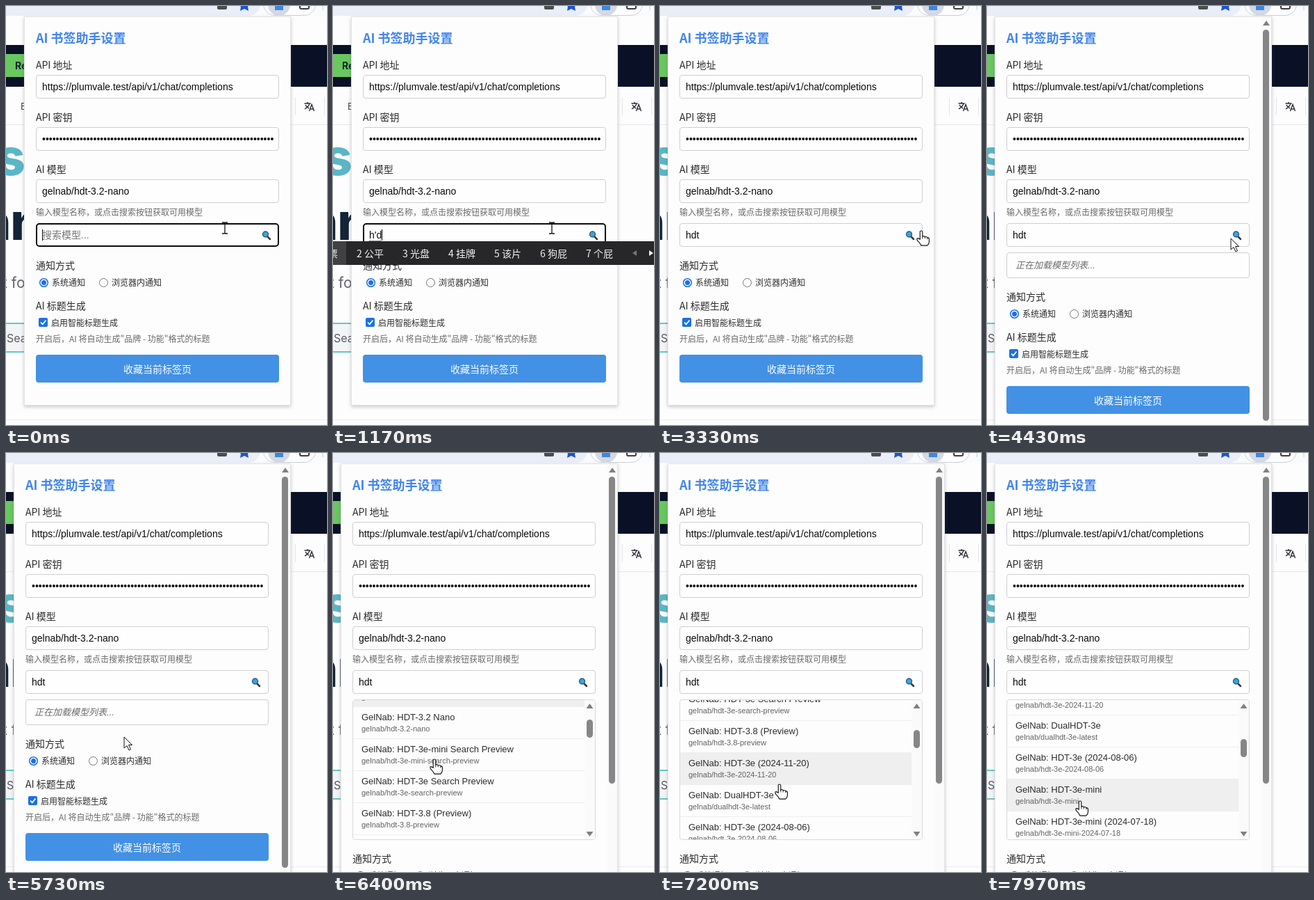
An HTML page that plays this animation: 462x602 px, repeating every 8000 ms.

```html
<!DOCTYPE html>
<html lang="zh-CN">
<head>
<meta charset="utf-8">
<title>书签设置</title>
<style>
html, body { margin: 0; width: 100%; height: 100%; overflow: hidden; background: #fdfdfe; }
#stage { position: absolute; left: 0; top: 0; width: 462px; height: 602px; overflow: hidden; background: #fdfdfe; color: #2c2c2e; }
#stage div, #stage svg { position: absolute; box-sizing: border-box; }
#stage svg { left: 0; top: 0; overflow: visible; }
#content, #lower, #cursor { left: 0; top: 0; }
.t { white-space: pre; line-height: 20px; }
.cjk { font-family: "Noto Sans CJK SC", "Noto Sans CJK", sans-serif; }
.arial { font-family: "Liberation Sans", "Noto Sans CJK SC", "Noto Sans CJK", sans-serif; }
.inter { font-family: Inter, sans-serif; }
.field { border: 1px solid #cfcfd4; border-radius: 4px; background: #fefefe; }
.field.focus { border: 2px solid #0c0c0e; border-radius: 5px; }
#card { top: 15px; background: #fdfdfd; border: 1px solid #e4e4e6; box-shadow: 0 2px 5px rgba(80, 80, 90, .3); }
#query i { display: inline-block; width: 1px; height: 16px; margin-right: -1px; vertical-align: -3px; background: #000; }
#query u { text-decoration: underline dotted 1px; text-underline-offset: 3px; }
#query em { font-style: normal; color: #757575; }
#list { left: 43px; top: 354px; width: 350px; height: 202px; overflow: hidden; border: 1px solid #d9d9dc; border-radius: 4px; background: #fdfdfd; }
#rows { left: 0; top: 0; width: 333px; }
.row { left: 0; width: 333px; height: 46px; border-bottom: 1px solid #eeeeef; }
.row.on { background: #efefef; }
#ime { left: 0; top: 338px; width: 462px; height: 34px; background: #272729; overflow: hidden; }
</style>
</head>
<body>
<div id="stage"></div>
<script>
const LOOP = 8000;
const stage = document.getElementById('stage');

function box(parent, css, className = '', id = '') {
  const el = document.createElement('div');
  el.className = className;
  el.id = id;
  el.style.cssText = css;
  parent.append(el);
  return el;
}
const rect = (parent, x, y, w, h, css = '', cls = '', id = '') =>
  box(parent, `left:${x}px;top:${y}px;width:${w}px;height:${h}px;${css}`, cls, id);

// y is the centre of the text line
function text(parent, x, y, size, str, cls = 'cjk', css = '') {
  const el = box(parent, `left:${x}px;top:${y - 10}px;font-size:${size}px;${css}`, 't ' + cls);
  el.textContent = str;
  return el;
}
function svg(parent, markup) {
  parent.insertAdjacentHTML('beforeend', `<svg width="1" height="1">${markup}</svg>`);
  return parent.lastElementChild;
}

// Browser toolbar and the page behind the popup
rect(stage, 0, 0, 462, 15, 'background:#fafbfe');
rect(stage, -20, -20, 386, 34, 'background:#e9eef8;border-radius:17px');
rect(stage, 370, -20, 76, 34, 'background:#fdfdfe;border:1px solid #cdd0d8;border-radius:17px');
svg(stage, `<circle cx="393" cy="-2" r="16" fill="#d3d9e4"/>
  <rect x="387" y="-6" width="12" height="12" fill="#3f86e4"/>
  <rect x="304" y="-8" width="14" height="13" rx="2" fill="#4c4c50"/>
  <path d="M343-10l3 6 6 1-4 4 1 6-6-3-6 3 1-6-4-4 6-1z" fill="#1b53d6"/>
  <rect x="423" y="-8" width="13" height="12" rx="2" fill="none" stroke="#3d3d42" stroke-width="2"/>
  <path d="M456 0v6" stroke="#c8ccd6"/>`);
rect(stage, 0, 56, 462, 60, 'background:#0a1026');
rect(stage, -30, 69, 90, 33, 'background:#69c75f;border-radius:3px');
text(stage, 13, 86, 14, 'Re', 'inter', 'font-weight:700;color:#10222c');
text(stage, 21, 144, 13, 'E', 'inter', 'color:#44444a');
rect(stage, 0, 170, 462, 1, 'background:#e8e8ee');
rect(stage, 0, 594, 462, 1, 'background:#ececf2');
rect(stage, 416, 131, 1, 26, 'background:#e4e4ea');
rect(stage, 458, 131, 1, 26, 'background:#e4e4ea');
svg(stage, `<g fill="none" stroke="#2c2c38" stroke-width="1.4">
  <path d="M429.500 140h9M434 138v2M437 140c-1 4-4 6-7 8M431 142c1 3 3 4 5 5"/>
  <path d="M436.500 151l3.500-9.500 3.500 9.500M437.700 148h4.600"/></g>`);
text(stage, -14, 217, 73, 's', 'inter', 'font-weight:800;color:#5ab6c6');
text(stage, -39, 310, 73, 'nn', 'inter', 'font-weight:800;color:#122436;letter-spacing:-1px');
text(stage, -5, 398, 21, 't for', 'inter', 'color:#64646c');
rect(stage, -20, 455, 120, 43, 'background:#f3f4f6;border:2px solid #62c8c6');
text(stage, 1, 477, 16, 'Search', 'inter', 'color:#5a5a64');

// Popup
const card = box(stage, '', '', 'card');
const content = box(stage, '', '', 'content');
const label = (parent, y, str) => text(parent, 43, y - 1, 14, str, 'cjk', 'font-weight:500');
const field = (y, str) => {
  const el = rect(content, 43, y, 350, 34, '', 'field');
  const value = text(content, 52, y + 17, 14, str, 'arial', 'color:#0a0a0a;width:333px;overflow:hidden');
  return { el, value };
};
text(content, 43, 45, 18, 'AI 书签助手设置', 'cjk', 'font-weight:700;color:#4285ee');
label(content, 85, 'API 地址');
field(99, 'https://plumvale.test/api/v1/chat/completions');
label(content, 160, 'API 密钥');
field(174, '•'.repeat(68));
label(content, 235, 'AI 模型');
field(249, 'gelnab/hdt-3.2-nano');
text(content, 43, 296, 12, '输入模型名称，或点击搜索按钮获取可用模型', 'cjk', 'color:#6a6a6c');
const search = field(312, '');
search.value.id = 'query';
svg(content, `<path d="M376 331l4 4" stroke="#3a3a3e" stroke-width="2.500" stroke-linecap="round"/>
  <circle cx="373.500" cy="328" r="4" fill="#36a4e0" stroke="#30597c" stroke-width="1.400"/>`);

const lower = box(content, '', '', 'lower');
label(lower, 373, '通知方式');
text(lower, 66, 397, 12, '系统通知');
text(lower, 152, 397, 12, '浏览器内通知');
label(lower, 431, 'AI 标题生成');
text(lower, 65, 455, 12, '启用智能标题生成');
text(lower, 43, 478, 12, '开启后，AI 将自动生成"品牌 - 功能"格式的标题', 'cjk', 'color:#6a6a6c');
svg(lower, `<circle cx="54.500" cy="397.500" r="5.800" fill="#fdfdfd" stroke="#1a70e4" stroke-width="1.500"/>
  <circle cx="54.500" cy="397.500" r="3.500" fill="#1a70e4"/>
  <circle cx="140.500" cy="397.500" r="6" fill="#fdfdfd" stroke="#767676"/>
  <rect x="47" y="448" width="13" height="13" rx="2" fill="#1a70e4"/>
  <path d="M50 454.500l2.700 2.800 4.800-5.800" fill="none" stroke="#fff" stroke-width="1.800"/>`);
const button = rect(lower, 43, 501, 350, 40, 'background:#4391e4;border-radius:4px');
text(button, 126, 20, 14, '收藏当前标签页', 'cjk', 'color:#fff;font-weight:500');

const loading = rect(content, 43, 354, 350, 37, '', 'field');
text(loading, 12, 18, 13, '正在加载模型列表...', 'arial', 'font-style:italic;color:#6a6a6c');

// Search results
const models = [
  ['HDT-3.2', 'hdt-3.2'],
  ['HDT-3.2 Mini', 'hdt-3.2-mini'],
  ['HDT-3.2 Nano', 'hdt-3.2-nano'],
  ['HDT-3e-mini Search Preview', 'hdt-3e-mini-search-preview'],
  ['HDT-3e Search Preview', 'hdt-3e-search-preview'],
  ['HDT-3.8 (Preview)', 'hdt-3.8-preview'],
  ['HDT-3e (2024-11-20)', 'hdt-3e-2024-11-20'],
  ['DualHDT-3e', 'dualhdt-3e-latest'],
  ['HDT-3e (2024-08-06)', 'hdt-3e-2024-08-06'],
  ['HDT-3e-mini', 'hdt-3e-mini'],
  ['HDT-3e-mini (2024-07-18)', 'hdt-3e-mini-2024-07-18'],
  ['HDT-3e', 'hdt-3e']
];
const list = box(content, '', '', 'list');
const rowsBox = box(list, '', '', 'rows');
const rows = models.map(([name, slug], i) => {
  const row = box(rowsBox, `top:${i * 46}px`, 'row');
  text(row, 12, 15, 13, 'GelNab: ' + name, 'arial');
  text(row, 12, 31, 11, 'gelnab/' + slug, 'arial', 'color:#636366');
  return row;
});
rect(list, 333, 0, 15, 200, 'background:#fafafa');
svg(list, '<path d="M335.500 12l5-7 5 7zM335.500 189l5 7 5-7z" fill="#808082"/>');
const listThumb = rect(list, 336, 17, 9, 26, 'background:#868688;border-radius:5px');

const outerBar = rect(stage, 395, 16, 14, 586, 'background:#fafafa');
svg(outerBar, '<path d="M2 12l5-7 5 7z" fill="#808082"/>');
const outerThumb = rect(outerBar, 2, 18, 9, 562, 'background:#868688;border-radius:5px');

// Input method candidates
const ime = box(stage, '', '', 'ime');
rect(ime, -60, 0, 79, 34, 'background:#414143');
['股票', '公平', '光盘', '挂牌', '该片', '狗屁', '个屁'].forEach((word, i) =>
  text(ime, -32 + 66 * i, 17, 14, `${i + 1} ${word}`, 'cjk', 'color:#f2f2f2'));
svg(ime, '<path d="M437 13v8l-6-4z" fill="#77777a"/><path d="M455 13v8l6-4z" fill="#f2f2f2"/>');

// Pointer shapes, hot spot at 0,0
const cursor = box(stage, '', '', 'cursor');
const pointers = {
  beam: svg(cursor, '<path d="M-4-8h3l1 1 1-1h3M-4 8h3l1-1 1 1h3M0-7v14" fill="none" stroke="#111" stroke-width="1.300"/>'),
  hand: svg(cursor, `<g transform="scale(.88)"><path d="M-2 2q0-2 2-2t2 2v7q3-1 4 1 3-1 4 1 3 0 3 3v4q0 3-3 6H0q-2-4-6-8-2-3 0-4 2 0 4 2z"
    fill="#fff" stroke="#111" stroke-width="1.300" stroke-linejoin="round"/><path d="M2 9v4M6 10v3M10 11v3" stroke="#111"/></g>`),
  arrow: svg(cursor, '<path d="M0 0v16l4-3.500 3 6.500 2.500-1.200-3-6.300h5z" fill="#fff" stroke="#111" stroke-linejoin="round"/>')
};

// Timeline: [ms, x, y, pointer]
const path = [
  [0, 315, 319, 'beam'], [2450, 315, 319, 'beam'], [2850, 364, 325, 'hand'], [3050, 376, 323, 'hand'],
  [4230, 376, 323, 'arrow'], [4900, 262, 374, 'arrow'], [5450, 170, 408, 'arrow'], [5750, 170, 408, 'arrow'],
  [5860, 165, 418, 'hand'], [6150, 146, 440, 'hand'], [6550, 146, 440, 'hand'], [7000, 172, 476, 'hand'],
  [7350, 172, 476, 'hand'], [7800, 134, 500, 'hand'], [8000, 134, 500, 'hand']
];
const typed = [[0, ''], [830, 'h'], [980, "h'd"], [1330, "h'd't"], [1750, 'hdt']];
const COMMIT = 1750, BLUR = 3230, SHIFT = 3300, LOAD = 3365, RESULTS = 5860;
const ticks = [6283, 6780, 7530], TICK = 204;

const last = (steps, t) => steps.filter(s => s[0] <= t).pop();
const show = (el, on) => { el.style.display = on ? '' : 'none'; };
const smooth = p => p * p * (3 - 2 * p);

function movePointer(t) {
  const i = path.findLastIndex(k => k[0] <= t);
  const a = path[i], b = path[i + 1] || a;
  const p = b === a ? 0 : smooth((t - a[0]) / (b[0] - a[0]));
  const x = Math.round(a[1] + (b[1] - a[1]) * p), y = Math.round(a[2] + (b[2] - a[2]) * p);
  cursor.style.transform = `translate(${x}px,${y}px)`;
  for (const kind in pointers) show(pointers[kind], kind === a[3]);
  return y;
}

function render(t) {
  const focused = t < BLUR, loaded = t >= RESULTS, waiting = t >= LOAD && !loaded;
  const composing = t >= typed[1][0] && t < COMMIT;
  const shifted = t >= SHIFT, wide = t >= LOAD;

  card.style.left = (shifted ? 11 : 26) + 'px';
  card.style.width = (wide ? 399 : 384) + 'px';
  card.style.height = (wide ? 700 : 559) + 'px';
  content.style.transform = `translateX(${shifted ? -15 : 0}px)`;
  lower.style.transform = `translateY(${loaded ? 210 : waiting ? 45 : 0}px)`;
  show(outerBar, wide);
  outerThumb.style.height = (loaded ? 441 : 562) + 'px';
  show(loading, waiting);
  show(list, loaded);
  show(ime, composing);

  const [since, value] = last(typed, t);
  const caret = focused && (t - since) % 1000 < 500 ? '<i></i>' : '';
  search.el.classList.toggle('focus', focused);
  const html = value ? (composing ? `<u>${value}</u>` : value) + caret : caret + '<em>搜索模型...</em>';
  if (search.value.innerHTML !== html) search.value.innerHTML = html;

  const y = movePointer(t);
  const scroll = Math.round(ticks.reduce((sum, start) => {
    const p = Math.min(1, Math.max(0, (t - start) / TICK));
    return sum + 100 * (1 - (1 - p) ** 2);
  }, 0));
  // The highlight only follows once a scroll has settled
  const settled = 100 * ticks.filter(start => t >= start + TICK).length;
  const hovered = loaded ? Math.floor((y - 355 + settled) / 46) : -1;
  rowsBox.style.top = -scroll + 'px';
  listThumb.style.top = 17 + Math.round(scroll / 7.7) + 'px';
  rows.forEach((row, i) => row.classList.toggle('on', i === hovered));
}

const begin = performance.now();
function frame() {
  render((performance.now() - begin) % LOOP);
  requestAnimationFrame(frame);
}
frame();
</script>
</body>
</html>
```
